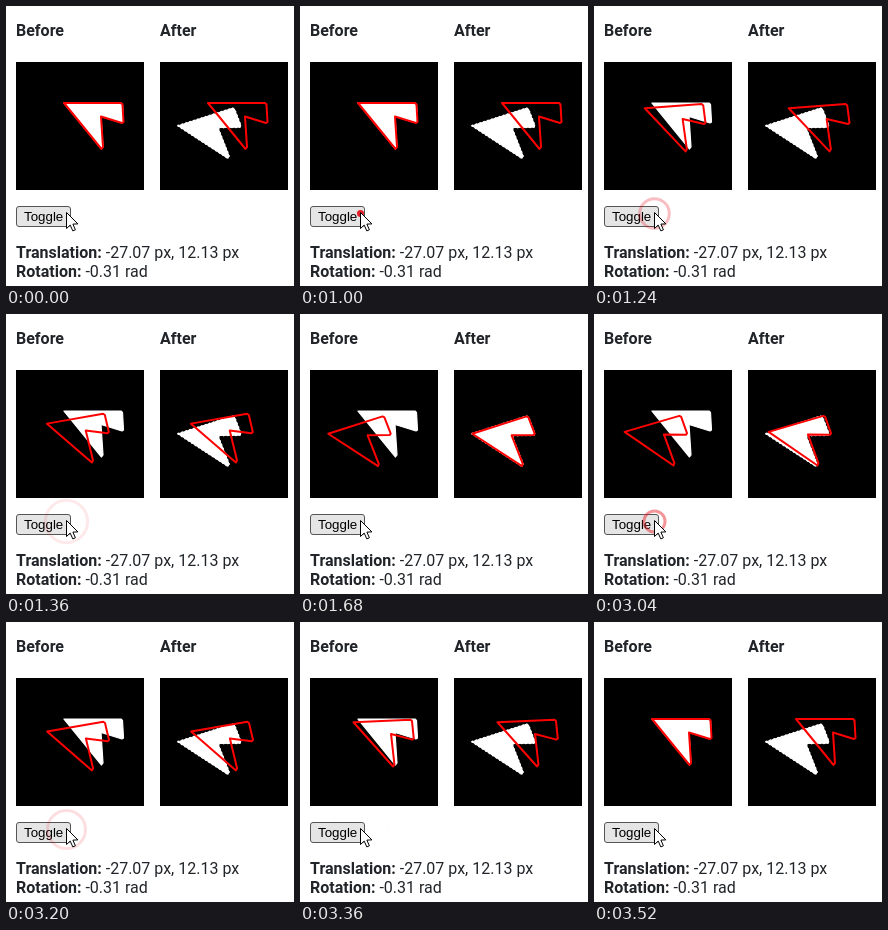
An HTML page with a canvas that plays this animation: 288x280 px, repeating every 3560 ms.

```html
<!DOCTYPE html>
<html lang="en">
<head>
<meta charset="utf-8">
<title>Shape alignment</title>
<style>
  html, body { margin: 0; width: 100%; height: 100%; overflow: hidden; background: #fff; }
  body { position: relative; font: 16px Roboto, sans-serif; color: #212529; }
  p, b.head, .button, canvas { position: absolute; margin: 0; white-space: nowrap; }
  p, b.head { line-height: 19px; }
  .button {
    left: 10px; top: 200px; padding: 2px 7px;
    border: 1px solid #555; border-radius: 3px; background: #e5e5e5; color: #000;
    font: 13.333px/15px "Liberation Sans", Arial, sans-serif;
  }
  canvas { left: 0; top: 0; }
</style>
</head>
<body>
<b class="head" style="left:10px;top:15px">Before</b>
<b class="head" style="left:154px;top:15px">After</b>
<div class="button">Toggle</div>
<p style="left:10px;top:237px"><b>Translation:</b> -27.07 px, 12.13 px</p>
<p style="left:10px;top:256px"><b>Rotation:</b> -0.31 rad</p>
<canvas id="stage" width="288" height="280"></canvas>
<script>
const ctx = document.getElementById('stage').getContext('2d');

const LOOP = 3560;
const CLICKS = [1000, 2880];
const DELAY = 40, MOVE = 600, RIPPLE = 520;
const PANELS = [10, 154];

// Arrow outline, relative to its pivot
const PIVOT = { x: 78, y: 56 };
const SHIFT = { x: -26.6, y: 12.9 };
const ANGLE = -0.31;
const ARROW = [[-30, -15], [27, -15], [28.5, -13.5], [29.5, 4], [28, 5],
               [7, -1.5], [9, 29], [7.5, 31]];
const CURSOR = [[0, 0], [0, 16], [3.7, 12.6], [6.3, 18.4], [8.9, 17.3],
                [6.4, 11.6], [11.4, 11.4]];

const clamp = v => Math.min(1, Math.max(0, v));

// cubic-bezier(.42, 0, .58, 1), solved by bisection
function easeInOut(x) {
  let lo = 0, hi = 1;
  for (let i = 0; i < 24; i++) {
    const s = (lo + hi) / 2;
    const bx = 1.26 * s * (1 - s) ** 2 + 1.74 * s * s * (1 - s) + s ** 3;
    if (bx < x) lo = s; else hi = s;
  }
  return lo * lo * (3 - 2 * lo);
}

function trace(points) {
  ctx.beginPath();
  points.forEach(([x, y]) => ctx.lineTo(x, y));
  ctx.closePath();
}

// Arrow pose: 0 = first position, 1 = moved and turned
function withArrow(panelX, pose, paint) {
  ctx.save();
  ctx.translate(panelX + PIVOT.x + SHIFT.x * pose, 56 + PIVOT.y + SHIFT.y * pose);
  ctx.rotate(ANGLE * pose);
  ctx.lineJoin = ctx.lineCap = 'round';
  trace(ARROW);
  paint();
  ctx.restore();
}

function drawPanel(x, shapePose, outlinePose) {
  ctx.fillStyle = '#000';
  ctx.fillRect(x, 56, 128, 128);
  withArrow(x, shapePose, () => {
    ctx.fillStyle = ctx.strokeStyle = '#fff';
    ctx.fill();
    ctx.lineWidth = 1.2;
    ctx.stroke();
    if (shapePose) {  // bumpy edge of the resampled shape
      ctx.setLineDash([0.1, 4]);
      ctx.lineWidth = 2.2;
      ctx.stroke();
    }
  });
  withArrow(x, outlinePose, () => {
    ctx.strokeStyle = '#f00';
    ctx.lineWidth = 2;
    ctx.stroke();
  });
}

function drawRipple(age) {
  if (age < 0 || age >= RIPPLE) return;
  ctx.beginPath();
  ctx.arc(60.5, 207.5, 2 + age * 0.053, 0, Math.PI * 2);
  ctx.strokeStyle = `rgba(230, 20, 30, ${0.95 * (1 - age / RIPPLE) ** 2})`;
  ctx.lineWidth = 3;
  ctx.stroke();
}

function drawCursor() {
  ctx.save();
  ctx.translate(60.5, 206.5);
  trace(CURSOR);
  ctx.fillStyle = '#fff';
  ctx.strokeStyle = '#000';
  ctx.lineWidth = 1;
  ctx.fill();
  ctx.stroke();
  ctx.restore();
}

function draw(t) {
  const [out, back] = CLICKS.map(c => easeInOut(clamp((t - c - DELAY) / MOVE)));
  const pose = out - back;
  ctx.clearRect(0, 0, 288, 280);
  PANELS.forEach((x, i) => drawPanel(x, i, pose));
  CLICKS.forEach(c => drawRipple(t - c));
  drawCursor();
}

const start = performance.now();
function tick() {
  draw((performance.now() - start) % LOOP);
  requestAnimationFrame(tick);
}
tick();
</script>
</body>
</html>
```
